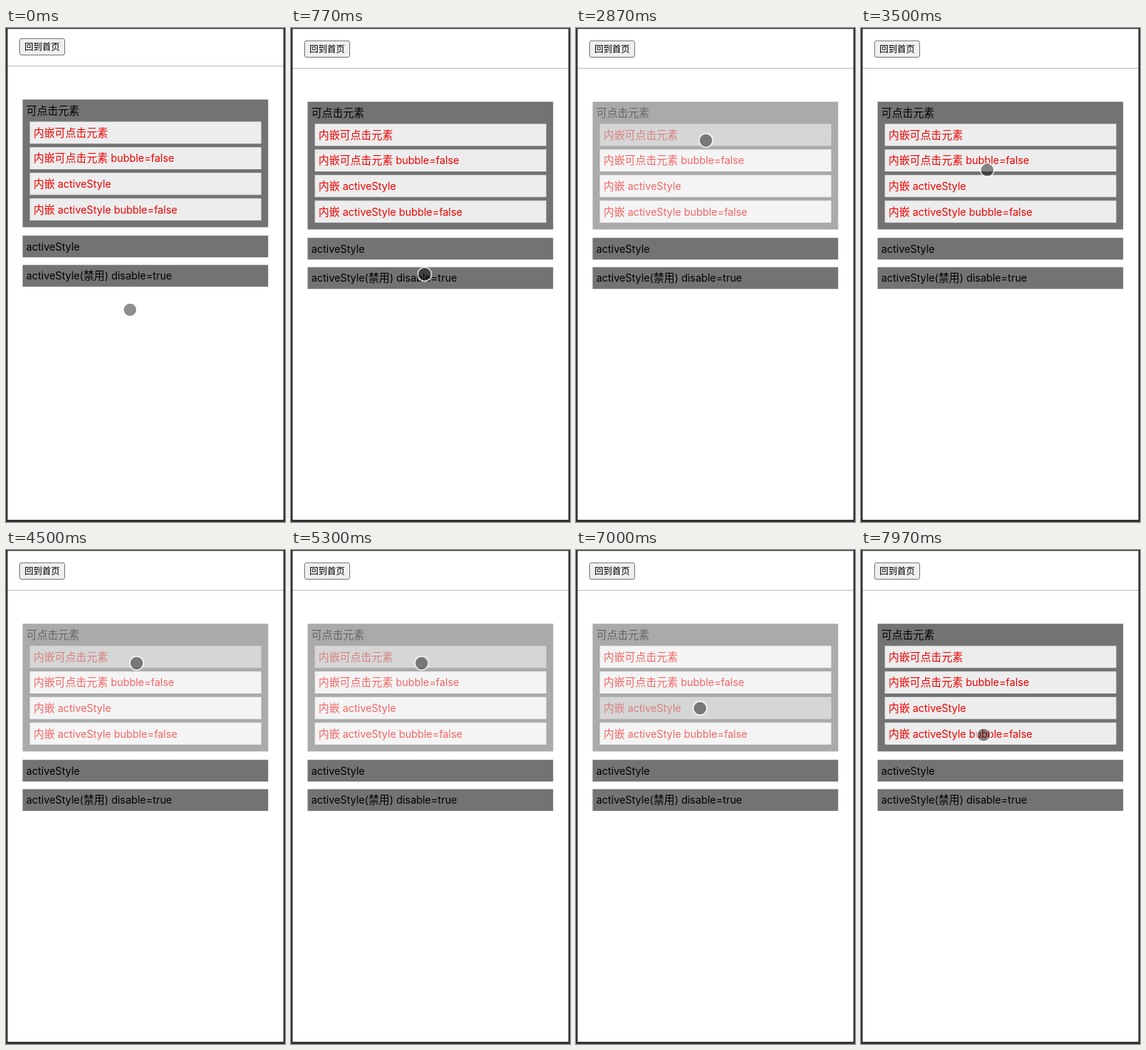
An HTML page for the animation above (8000 ms loop, 378x668 px).

```html
<!DOCTYPE html>
<html lang="zh">
<head>
<meta charset="utf-8">
<style>
html, body { margin: 0; width: 100%; height: 100%; overflow: hidden; background: #fff; }
svg { display: block; }
text { font: 300 14.4px "Noto Sans CJK SC", "Noto Sans CJK", sans-serif; white-space: pre; }
tspan { font: 400 13.9px Inter, sans-serif; }
.block > rect { fill: #737373; }
.inner > rect { fill: #ededed; }
.inner > text { fill: #f00000; }
#home rect { fill: #efefef; stroke: #767676; }
#home text { font-size: 12px; font-weight: 400; }
#cursor { fill: rgba(0,0,0,.44); }
#cursor circle + circle { fill: none; stroke: rgba(255,255,255,.7); stroke-width: 1.8; }
</style>
</head>
<body>
<svg width="378" height="668" viewBox="0 0 378 668">
  <g id="page">
    <g id="home">
      <rect x="18.5" y="17.3" width="61" height="22.2" rx="2.5"/>
      <text x="25" y="32.8">回到首页</text>
    </g>
    <rect y="54" width="378" height="1" fill="#bdbdbd"/>
  </g>
  <g id="cursor"><circle r="8.6"/><circle r="9.4"/></g>
  <path fill="#333" fill-rule="evenodd" d="M0 0H378V668H0ZM2.3 1.3H375.8V665H2.3Z"/>
</svg>
<script>
const LOOP = 8000, HOLD = 250, GLIDE = 450;
const page = document.getElementById('page');
const cursor = document.getElementById('cursor');

// Latin runs get their own font
const markup = label => label.replace(/[ -~]+/g, '<tspan>$&</tspan>');

function addBox(parent, kind, label, x, y, width, height, textY = y + height / 2) {
  const box = document.createElementNS('http://www.w3.org/2000/svg', 'g');
  box.setAttribute('class', kind);
  box.innerHTML = `<rect x="${x}" y="${y}" width="${width}" height="${height}"/>
    <text x="${x + 5}" y="${textY + 5.2}">${markup(label)}</text>`;
  parent.append(box);
  return box;
}
const addBlock = (label, y, height, textY) => addBox(page, 'block', label, 22.5, y, 332.7, height, textY);

const outer = addBlock('可点击元素', 99.7, 172.7, 114.6);
const styled = addBlock('activeStyle', 283.7, 29.4);
addBlock('activeStyle(禁用) disable=true', 323.4, 29.4);

const inner = ['内嵌可点击元素', '内嵌可点击元素 bubble=false', '内嵌 activeStyle', '内嵌 activeStyle bubble=false']
  .map((label, i) => addBox(outer, 'inner', label, 32.3, 129.6 + i * 34.6, 313.5, 29.8));

// The pointer glides from stop to stop and may press a box on arrival
const stop = (at, x, y, box) => ({ at, x, y, box });
const stops = [
  stop(0, 168, 381),
  stop(220, 170, 431),
  stop(770, 181, 333),
  stop(1320, 173, 300, styled),
  stop(2030, 170, 271.5),
  stop(2200, 168, 250, inner[3]),
  stop(2750, 176, 152, inner[0]),
  stop(3500, 171, 192),
  stop(3650, 170, 180, inner[1]),
  stop(4370, 177, 153, inner[0]),
  stop(5250, 177, 153, inner[0]),
  stop(5950, 171, 176, inner[1]),
  stop(6880, 168, 214, inner[2]),
  stop(7700, 166, 250, inner[3])
];

const bubbles = box => !box.textContent.includes('bubble=false');
const mix = (a, b, p) => a + (b - a) * p;

function draw(t) {
  const last = stops.findLastIndex(s => s.at <= t);
  const from = stops[last];
  const to = stops[last + 1] ?? { ...from, at: LOOP };
  const leave = Math.max(from.at + (from.box ? HOLD : 0), to.at - GLIDE);
  const leaveAt = Math.min(leave, to.at - 1);
  const p = Math.max(0, (t - leaveAt) / (to.at - leaveAt));
  const eased = p * p * (3 - 2 * p);
  cursor.setAttribute('transform', `translate(${mix(from.x, to.x, eased)} ${mix(from.y, to.y, eased)})`);

  const pressed = t < from.at + HOLD ? from.box : null;
  for (const box of [styled, ...inner]) box.style.opacity = box === pressed ? 0.6 : 1;
  outer.style.opacity = inner.includes(pressed) && bubbles(pressed) ? 0.6 : 1;

  // Elastic overscroll settling back to rest
  const settle = Math.min(1, t / 600);
  const offset = -Math.round(6 * Math.sin(Math.PI * (1 + 5 * settle) / 6));
  page.setAttribute('transform', `translate(0 ${offset})`);
}

let start;
function tick(now) {
  start ??= now;
  draw((now - start) % LOOP);
  requestAnimationFrame(tick);
}
draw(0);
requestAnimationFrame(tick);
</script>
</body>
</html>
```
